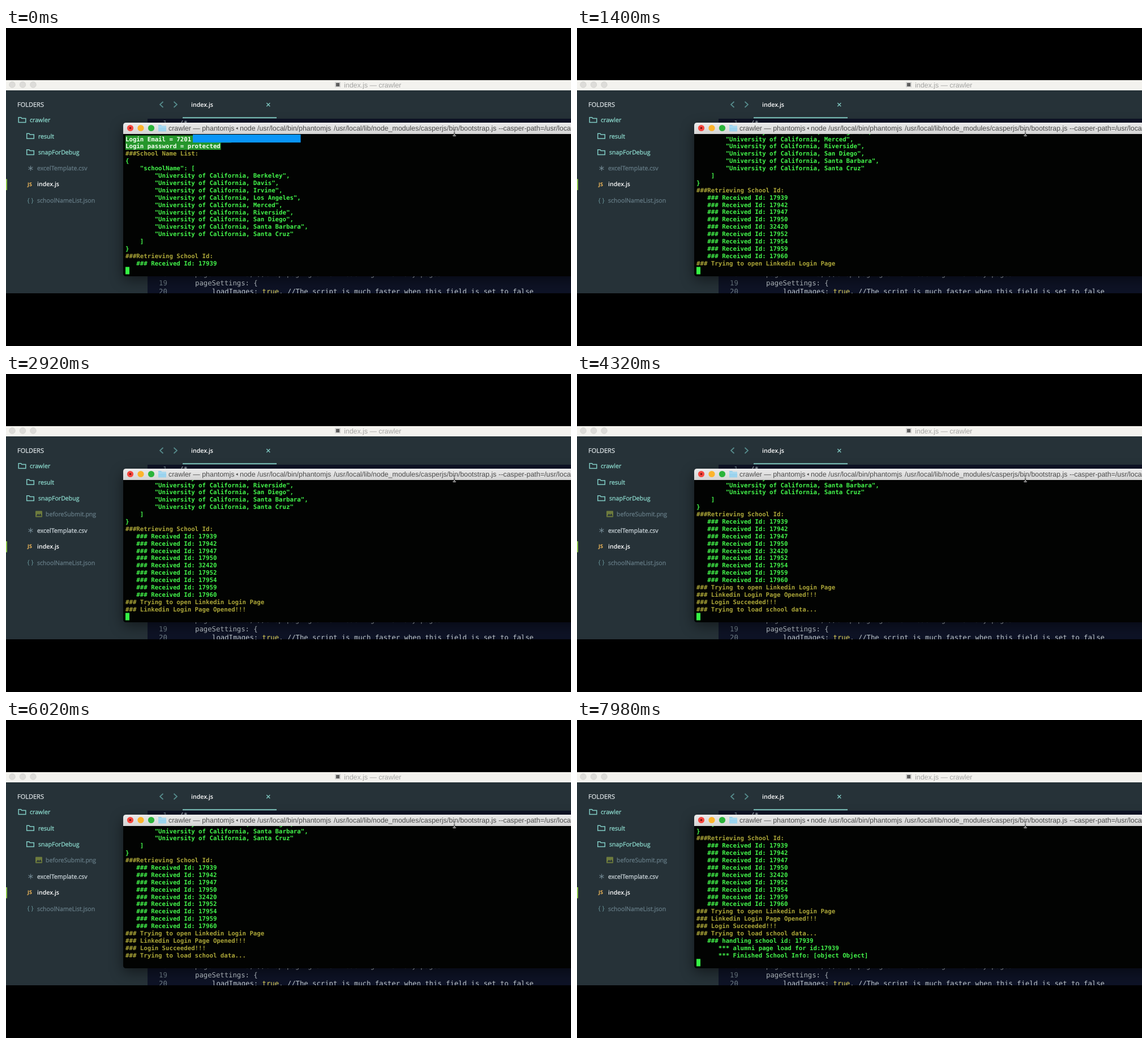
Animation, 998 px wide and 561 px high, one loop 8000 ms. Source, as an HTML page:

```html
<!DOCTYPE html>
<html lang="en">
<head>
<meta charset="utf-8">
<title>Crawler session</title>
<style>
  html, body { margin: 0; width: 100%; height: 100%; overflow: hidden; background: #000; }
  svg { display: block; width: 100vw; height: 100vh; }
  text { white-space: pre; text-rendering: geometricPrecision; }
  .ui { font: 500 10.6px "Open Sans", "Noto Sans", sans-serif; stroke-width: .3; }
  .title { font: 12.4px "Liberation Sans", Arial, sans-serif; }
  .term { font: bold 10.73px "DejaVu Sans Mono", monospace; }
  .code { font: 12.25px "DejaVu Sans Mono", monospace; fill: #c2cbd1; }
  .num { fill: #71808a; }
  .head { fill: #dbe2e5; stroke: #dbe2e5; font-size: 11px; }
  .teal { fill: #8ad6ca; stroke: #8ad6ca; }
  .dim { fill: #647a84; stroke: #647a84; }
  .lit { fill: #c9d3d8; stroke: #c9d3d8; }
  .active { fill: #fff; font-weight: 600; }
  .icon { fill: none; stroke: #80cbc4; stroke-width: 1.5; }
</style>
</head>
<body>
<svg viewBox="0 0 998 561" preserveAspectRatio="none">
  <defs>
    <linearGradient id="bar" x2="0" y2="1">
      <stop stop-color="#ebebeb"/><stop offset="1" stop-color="#d4d4d4"/>
    </linearGradient>
    <filter id="blur" x="-10%" y="-25%" width="120%" height="150%"><feGaussianBlur stdDeviation="12"/></filter>
    <clipPath id="stage"><rect y="92" width="998" height="376"/></clipPath>
    <clipPath id="body"><rect x="207" y="187" width="791" height="251"/></clipPath>
    <path id="folder" class="icon" d="M.7 9.6V1.2H5l1.3 1.7h7v7.2H.7z"/>
    <path id="beam" d="M789.5 178.5q2.5 0 2.5 1.5 0-1.5 2.5-1.5M792 180v8.5M789.5 190q2.5 0 2.5-1.5 0 1.5 2.5 1.5M790.5 185.5h3" fill="none"/>
  </defs>
  <rect width="998" height="561"/>
  <g clip-path="url(#stage)">
    <rect y="92" width="998" height="376" fill="#263238"/>
    <rect x="250" y="160" width="748" height="308" fill="#0e1326"/>

    <rect y="92" width="998" height="18" fill="#f3f2ee"/>
    <g fill="#dddcd9" stroke="#cfcecb" stroke-width=".7">
      <circle cx="11" cy="100" r="5.3"/><circle cx="29.5" cy="100" r="5.3"/><circle cx="48" cy="100" r="5.3"/>
    </g>
    <rect x="581" y="95.5" width="10" height="9" fill="#d0d0ce"/>
    <rect x="583" y="97" width="6" height="6" fill="#5d5d5d"/>
    <text class="title" x="597" y="104.5" fill="#a4a4a2">index.js — crawler</text>

    <g class="ui">
      <text class="head" x="20" y="139">FOLDERS</text>
      <use href="#folder" x="21.5" y="156.5"/>
      <text class="teal" x="42" y="166">crawler</text>
      <use href="#folder" x="36" y="185"/>
      <text class="teal" x="57" y="194.5">result</text>
      <use href="#folder" x="36" y="213.5"/>
      <text class="teal" x="57" y="223">snapForDebug</text>
      <g id="snapshot">
        <rect x="52" y="241.5" width="12" height="11" rx="1" fill="#6d7b3d"/>
        <path d="M53.5 250.5l3-4 2 2.5 2-3 2.5 4.5z" fill="#263238"/>
        <text class="dim" x="70" y="251">beforeSubmit.png</text>
      </g>
      <g id="files">
        <path d="M43.5 243v9M39.6 245.2l7.8 4.5M39.6 249.7l7.8-4.5" stroke="#6d838d" stroke-width="1.2"/>
        <text id="csv" x="55" y="251">excelTemplate.csv</text>
        <rect y="266.5" width="2" height="19.5" fill="#8bc34a"/>
        <text x="38" y="278.6" fill="#f0b85a" style="font-size:9px;font-weight:700">JS</text>
        <text class="active" x="55" y="279.4">index.js</text>
        <text x="37.5" y="307.8" fill="#6a979c" style="font-size:11px">{ }</text>
        <text class="dim" x="55" y="308">schoolNameList.json</text>
      </g>
      <path d="M277.5 130l-5.5 5 5.5 5M296.5 130l5.5 5-5.5 5" fill="none" stroke="#568c8d" stroke-width="1.7"/>
      <text class="active" x="327" y="138.8">index.js</text>
      <path d="M460.3 132.3l6 6m0-6l-6 6" stroke="#80cbc4" stroke-width="1.3"/>
    </g>
    <rect x="312" y="157.3" width="166" height="2" fill="#80cbc4"/>

    <g class="code">
      <text class="num" x="277" y="171.5">1</text><text x="306" y="171.5">/*</text>
      <text class="num" x="270" y="438">18</text>
      <text x="319" y="438">  pageLimit: 10, //Stop paging after reaching this many pages</text>
      <text class="num" x="270" y="453.5">19</text><text x="334" y="453.5">pageSettings: {</text>
      <text class="num" x="270" y="469">20</text>
      <text x="364" y="469">loadImages: <tspan fill="#e5d85c">true</tspan>, //The script is much faster when this field is set to false</text>
    </g>

    <rect x="207" y="176" width="820" height="268" opacity=".5" filter="url(#blur)"/>
    <path d="M207 186V172q0-5 5-5H998V438H212q-5 0-5-5z" fill="#020302"/>
    <path d="M207 187V172q0-5 5-5H998V187z" fill="url(#bar)"/>
    <circle cx="219.5" cy="176.5" r="5.6" fill="#f6473f"/><circle cx="219.5" cy="176.5" r="1.8" fill="#7d1712"/>
    <circle cx="238" cy="176.5" r="5.6" fill="#fcb42c"/>
    <circle cx="256.5" cy="176.5" r="5.6" fill="#2bb43a"/>
    <path d="M269 182.5V171h5l1.5 1.5h7.5v10z" fill="#9bd3ee"/>
    <path d="M269 174.5h14" stroke="#b9e2f4"/>
    <g class="title" fill="#4b4b4b">
      <text x="287" y="181">crawler — phantomjs</text>
      <path d="M406 177l3.5-2.3v4.6z"/>
      <text x="413" y="181">node</text>
      <text x="444" y="181">/usr/local/bin/phantomjs</text>
      <text x="579" y="181">/usr/local/lib/node_modules/casperjs/bin/bootstrap.js</text>
      <text x="870" y="181">--casper-path=/usr/local</text>
    </g>

    <g clip-path="url(#body)" class="term">
      <g id="log"></g>
      <rect id="caret" x="211" y="421.5" width="7" height="13" fill="#35f545"/>
    </g>
    <use href="#beam" stroke="#fff" stroke-width="2"/>
    <use href="#beam" stroke="#333"/>
  </g>
</svg>
<script>
const LOOP = 8000, ROW = 12.89, ROWS = 18;
const GREEN = '#43f54b', OLIVE = '#aca638', WHITE = '#f4fff0';
const $ = id => document.getElementById(id);

function add(tag, attrs, text = '') {
  const el = document.createElementNS('http://www.w3.org/2000/svg', tag);
  for (const key in attrs) el.setAttribute(key, attrs[key]);
  el.textContent = text;
  $('log').append(el);
  return el;
}

// Each line holds its text, colour and the time it is printed.
const lines = [];
const print = (text, fill = GREEN, at = 0) => lines.push({ text, fill, at });

print('Login Email = 7201', WHITE);
print('Login password = protected', WHITE);
print('###School Name List:', OLIVE);
print('{');
print('    "schoolName": [');
['Berkeley', 'Davis', 'Irvine', 'Los Angeles', 'Merced', 'Riverside', 'San Diego', 'Santa Barbara', 'Santa Cruz']
  .forEach((city, i) => print(`        "University of California, ${city}"${i < 8 ? ',' : ''}`));
print('    ]');
print('}');
print('###Retrieving School Id:', OLIVE);
[17939, 17942, 17947, 17950, 32420, 17952, 17954, 17959, 17960]
  .forEach((id, i) => print(`   ### Received Id: ${id}`, GREEN, i * 75));
print('### Trying to open Linkedin Login Page', OLIVE, 840);
print('### Linkedin Login Page Opened!!!', OLIVE, 1660);
print('### Login Succeeded!!!', OLIVE, 3340);
print('### Trying to load school data...', OLIVE, 3400);
print('   ### handling school id: 17939', GREEN, 6300);
print('      *** alumni page load for id:17939', GREEN, 7000);
print('      *** Finished School Info: [object Object]', GREEN, 7500);

add('rect', { x: 211, y: 189.5, width: 187, height: 12.9, fill: '#25962b' });
add('rect', { x: 211, y: 202, width: 168.5, height: 13, fill: '#25962b' });
const rows = lines.map((line, i) =>
  add('text', { x: 211, y: 199.6 + i * ROW, fill: line.fill }, line.text));
add('rect', { x: 330, y: 188, width: 190.5, height: 14, fill: '#0995f8' });

const show = (el, on) => el.setAttribute('visibility', on ? 'visible' : 'hidden');

function draw(t) {
  const count = lines.filter(line => line.at <= t).length;
  $('log').setAttribute('transform', `translate(0 ${(ROWS - count) * ROW})`);
  rows.forEach((row, i) => show(row, i < count));
  show($('caret'), t % 1280 < 820);

  const saved = t >= 2500;
  show($('snapshot'), saved);
  $('files').setAttribute('transform', `translate(0 ${saved ? 28.5 : 0})`);
  $('csv').setAttribute('class', saved ? 'lit' : 'dim');
}

const start = performance.now();
function tick() {
  draw((performance.now() - start) % LOOP);
  requestAnimationFrame(tick);
}
tick();
</script>
</body>
</html>
```
